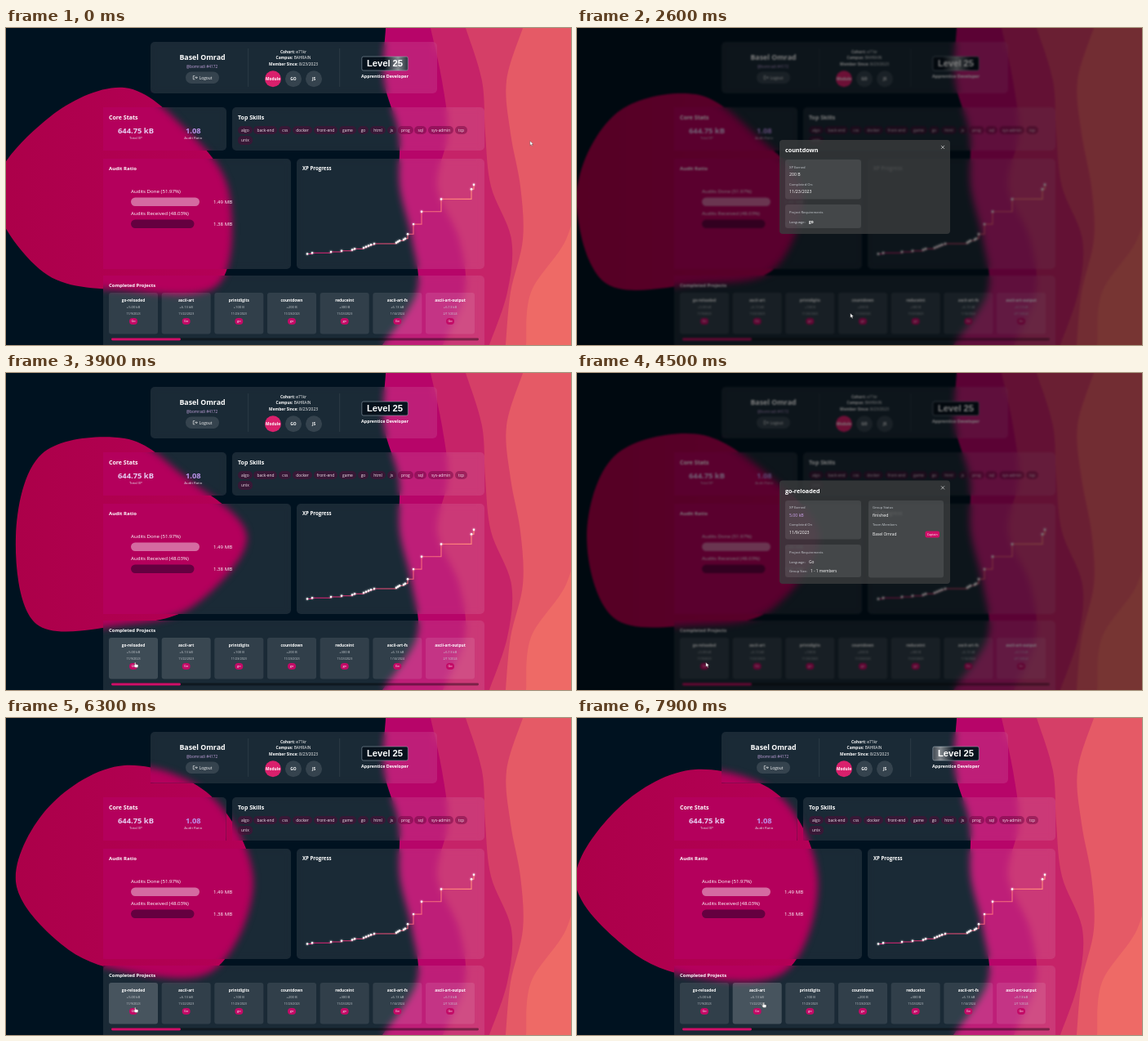
These frames come from a looping animation (692x388 px, 8 s). An HTML page:

```html
<!DOCTYPE html>
<html lang="en">
<head>
<meta charset="utf-8">
<title>Student dashboard</title>
<style>
  html, body { margin: 0; width: 100%; height: 100%; overflow: hidden; background: #001220; }
  #stage { position: relative; width: 692px; height: 388px; overflow: hidden; background: #001220;
    font-family: "Open Sans", "Noto Sans", sans-serif; }
  #stage > * { position: absolute; }
  svg { left: 0; top: 0; width: 692px; height: 388px; overflow: hidden; fill: #fff; }
  text { white-space: pre; }
  .plain { font-family: "Liberation Sans", Arial, sans-serif; }
  .card { border-radius: 5px; background: rgba(255, 255, 255, .1); backdrop-filter: blur(4px); }
  #tags { left: 284px; top: 119.7px; width: 287px; display: flex; flex-wrap: wrap; gap: 2px 1.9px; }
  #tags span { height: 10.5px; padding: 0 4px; border-radius: 5px; background: rgba(95, 0, 55, .42);
    font-size: 4.9px; line-height: 10.2px; color: #f6e3ee; }
  #shade { inset: 0; background: rgba(0, 0, 0, .5); backdrop-filter: blur(1.2px); }
  #dots { filter: drop-shadow(0 0 1px #fff); }
  #soft { filter: blur(4px); }
</style>
</head>
<body>
<div id="stage"></div>
<script>
const LOOP = 8000;
const stage = document.getElementById('stage');
const PERSON = 'Basel Omrad';
const PINK = '#cf0f68', LILAC = '#bd92ea', SOFT = '#c9ced3';

// ---------- helpers ----------
const attrs = o => Object.entries(o).map(([k, v]) => ` ${k}="${v}"`).join('');
const rect = (x, y, w, h, r, fill, o = {}) =>
  `<rect${attrs({ x, y, width: w, height: h, rx: r, fill, ...o })}/>`;
const circle = (cx, cy, r, fill) => `<circle${attrs({ cx, cy, r, fill })}/>`;
const text = (x, y, size, s, o = {}) =>
  `<text${attrs({ x, y, 'font-size': size, ...o })}>${s}</text>`;
const MID = { 'text-anchor': 'middle' };
const BOLD = { 'font-weight': 700 };
const MIDBOLD = { ...MID, ...BOLD };
const add = html => stage.insertAdjacentHTML('beforeend', html);
const layer = (id, body) => add(`<svg id="${id}" viewBox="0 0 692 388">${body}</svg>`);
const clamp = v => Math.max(0, Math.min(1, v));
const smooth = v => (v = clamp(v), v * v * (3 - 2 * v));

// Smooth path through points
function curve(pts, closed) {
  const n = pts.length;
  const at = i => closed ? pts[(i + n) % n] : pts[Math.max(0, Math.min(n - 1, i))];
  let d = 'M' + pts[0];
  for (let i = 0; i < (closed ? n : n - 1); i++) {
    const [a, b, c, e] = [at(i - 1), at(i), at(i + 1), at(i + 2)];
    const c1 = b.map((v, k) => (v + (c[k] - a[k]) / 6).toFixed(2));
    const c2 = c.map((v, k) => (v - (e[k] - b[k]) / 6).toFixed(2));
    d += `C${c1} ${c2} ${c}`;
  }
  return d;
}

// Linear interpolation in rows of [time, ...values]
function track(rows, t) {
  const next = rows.findIndex(r => r[0] >= t);
  if (next === 0) return rows[0].slice(1);
  if (next < 0) return rows[rows.length - 1].slice(1);
  const [a, b] = [rows[next - 1], rows[next]];
  const k = (t - a[0]) / (b[0] - a[0]);
  return a.slice(1).map((v, j) => v + (b[j + 1] - v) * k);
}

// ---------- background and cards ----------
// Left edge of each band at even heights
const WAVES = {
  '#b70569': [465, 463, 481, 482, 497, 503, 461],
  '#c62368': [520, 534, 541, 528, 555, 562, 535],
  '#d53f67': [563, 583, 587, 594, 619, 614, 592],
  '#e55a66': [633, 613, 618, 630, 633, 618, 612],
  '#ee6a66': [700, 700, 700, 700, 686, 643, 637],
};
layer('waves', Object.entries(WAVES).map(([fill, xs]) =>
  `<path fill="${fill}" d="${curve(xs.map((x, i) => [x, i * 388 / 6]))}L700 388V0Z"/>`).join(''));

const CARDS = [[177, 17, 351, 62.5], [119, 97, 150.5, 53], [277, 97, 309, 53],
  [119, 160, 230, 135], [356, 160, 230, 135], [119, 303, 467, 95]];
CARDS.forEach(([x, y, w, h]) =>
  add(`<div class="card" style="left:${x}px;top:${y}px;width:${w}px;height:${h}px"></div>`));

// The blob is sharp between the cards and soft inside them
const inside = CARDS.map(([x, y, w, h]) => `M${x} ${y}h${w}v${h}h${-w}z`).join('');
layer('blob', `<defs>
  <linearGradient id="rose"><stop stop-color="#ac0049"/><stop offset="1" stop-color="#b40057"/></linearGradient>
  <clipPath id="in"><path d="${inside}"/></clipPath>
  <clipPath id="out"><path clip-rule="evenodd" d="M-50-50h800v500h-800z${inside}"/></clipPath></defs>
  <g clip-path="url(#out)"><path class="blob" fill="url(#rose)"/></g>
  <g clip-path="url(#in)"><path class="blob" id="soft" fill="#b4005c"/></g>`);

// ---------- card contents ----------
function header() {
  const line = x => rect(x, 25, .6, 47, 0, 'rgba(255,255,255,.13)');
  const info = (y, k, v) => text(352, y, 4.85, `<tspan font-weight="700">${k}:</tspan> ${v}`, MID);
  const chip = (x, s, fill) => circle(x, 62.3, 10, fill) + text(x, 64.1, 4.8, s, MIDBOLD);
  const grey = 'rgba(255,255,255,.12)';
  return line(296.5) + line(408.5) +
    text(240.5, 39, 8.8, PERSON, MIDBOLD) +
    text(240, 49, 4.8, '@bomradi #4172', { ...MID, fill: '#c3a3dc' }) +
    rect(220, 53.5, 41, 14.5, 7.2, grey) +
    '<path d="M231.3 58.6h-2v4.2h2M231 60.7h3.2m-1.2-1.3 1.3 1.3-1.3 1.3" fill="none" stroke="#fff" stroke-width=".6"/>' +
    text(236.8, 62.6, 4.8, 'Logout') +
    info(31, 'Cohort', 'e71kr') + info(38.3, 'Campus', 'BAHRAIN') +
    info(45.7, 'Member Since', '8/23/2023') +
    chip(327, 'Module', '#d9206c') + chip(352, 'GO', grey) + chip(377, 'JS', grey) +
    `<defs><linearGradient id="shine"><stop stop-color="#fff" stop-opacity="0"/>
      <stop offset=".5" stop-color="#fff" stop-opacity=".5"/>
      <stop offset="1" stop-color="#fff" stop-opacity="0"/></linearGradient>
      <clipPath id="plate">${rect(435.8, 35, 56.5, 17, 2, '#fff')}</clipPath></defs>` +
    rect(435.8, 35, 56.5, 17, 2, '#07121d', { stroke: '#8fa0ae', 'stroke-width': .6 }) +
    `<g clip-path="url(#plate)">${rect(-17, 35, 34, 17, 0, 'url(#shine)', { id: 'sheen' })}</g>` +
    text(464, 47.4, 11.2, 'Level 25', { ...MIDBOLD, class: 'plain' }) +
    text(464, 61, 5.35, 'Apprentice Developer', MIDBOLD);
}

function stats() {
  const stat = (x, v, label, fill) =>
    text(x, 129, 9.4, v, { ...MIDBOLD, fill }) + text(x, 135.6, 4.3, label, { ...MID, fill: '#e3dbe6' });
  return text(126, 112.4, 7, 'Core Stats', BOLD) +
    stat(159, '644.75 kB', 'Total XP', '#e6cdf2') + stat(229.3, '1.08', 'Audit Ratio', LILAC);
}

function audits() {
  const row = (y, label, w, fill, size) => text(153, y, 6.13, label) +
    rect(153, y + 5.2, w, 10.4, 5.2, fill) + text(254, y + 12.9, 6.1, size);
  return text(126, 173.8, 6.05, 'Audit Ratio', BOLD) +
    row(202.4, 'Audits Done (51.97%)', 84, 'rgba(255,255,255,.42)', '1.49 MB') +
    row(229.3, 'Audits Received (48.03%)', 77.5, 'rgba(45,0,45,.58)', '1.38 MB');
}

function chart() {
  const days = [369, 375, 398, 411, 424, 427, 438, 441, 444, 447, 451, 478, 480, 482, 487, 489,
    492, 499, 509, 533, 570, 573];
  // Steady gain per step, with a late surge
  const pts = days.map((x, i) => [x, +(276.5 - 1.25 * i - 58.5 * smooth((i - 15) / 6)).toFixed(1)]);
  const d = pts.map(([x, y], i) => i ? `H${x}V${y}` : `M${x} ${y}`).join('');
  return `<defs><linearGradient id="ink" gradientUnits="userSpaceOnUse" x1="369" x2="573">
    <stop stop-color="#e01a78"/><stop offset="1" stop-color="#ff8b7c"/></linearGradient></defs>` +
    text(363, 173.8, 6.1, 'XP Progress', BOLD) +
    `<path d="${d}" fill="none" stroke="url(#ink)" stroke-width="1.1"/>` +
    `<g id="dots">${pts.map(([x, y]) => circle(x, y, 1.2, '#fff')).join('')}</g>`;
}

const PROJECTS = [
  ['go-reloaded', '+5.00 kB', '11/9/2023', 'Go'], ['ascii-art', '+6.13 kB', '11/22/2023', 'Go'],
  ['printdigits', '+100 B', '11/23/2023', 'go'], ['countdown', '+200 B', '11/23/2023', 'go'],
  ['reduceint', '+300 B', '11/23/2023', 'go'], ['ascii-art-fs', '+6.13 kB', '1/14/2024', 'Go'],
  ['ascii-art-output', '+6.13 kB', '2/11/2024', 'Go'],
];
const TILE = { x: 126, y: 324, w: 60, h: 50.5, step: 64.67 };
const tileX = i => TILE.x + i * TILE.step;

function projects() {
  const list = PROJECTS.map(([name, xp, date, lang], i) => {
    const x = tileX(i), c = x + TILE.w / 2;
    return rect(x, TILE.y, TILE.w, TILE.h, 3, '#fff', { class: 'tile' }) +
      text(c, 334.6, 4.8, name, MIDBOLD) +
      text(c, 343.4, 4.1, xp, { ...MID, fill: SOFT }) +
      text(c, 351.4, 3.6, date, { ...MID, fill: SOFT }) +
      rect(c - 5, 355, 10, 8, 4, '#c30a66') + text(c, 360.4, 3.9, lang, MID);
  }).join('');
  return text(126, 317, 5.9, 'Completed Projects', BOLD) + list +
    rect(129, 379.6, 450, 2.8, 1.4, 'rgba(0,0,0,.4)') + rect(129, 379.6, 85, 2.8, 1.4, PINK);
}

layer('front', header() + stats() + text(284, 112.4, 7, 'Top Skills', BOLD) +
  audits() + chart() + projects());
const SKILLS = 'algo back-end css docker front-end game go html js prog sql sys-admin tcp unix';
add(`<div id="tags">${SKILLS.split(' ').map(s => `<span>${s}</span>`).join('')}</div>`);

// ---------- dialogs ----------
add('<div id="shade"></div>');

const panel = (x, y, w, h) => rect(x, y, w, h, 3, 'rgba(255,255,255,.09)');
const label = (x, y, s) => text(x, y, 4.15, s, { fill: SOFT });
const value = (x, y, s, o) => text(x, y, 5.2, s, o);
const field = (x, y, name, s, o) => label(x, y, name) + value(x, y + 9.3, s, o);

function dialog(top, height, name, body) {
  return rect(248, top, 209, height, 4, 'rgba(58,60,62,.82)') +
    text(255, top + 15.4, 7.2, name, BOLD) +
    `<path d="M446 ${top + 6.9}l4 4m0-4l-4 4" stroke="#ddd" stroke-width=".7"/>` + body;
}
layer('dialogA', dialog(137, 115, 'countdown',
  panel(255, 161, 93, 48.5) + panel(255, 216, 93, 29) +
  field(260, 171.8, 'XP Earned', '200 B') + field(260, 192.8, 'Completed On:', '11/23/2023') +
  label(260, 226.6, 'Project Requirements') +
  label(260, 238.6, 'Language:') + text(284, 238.6, 4.8, 'go', BOLD)));
layer('dialogB', dialog(131.5, 126.5, 'go-reloaded',
  panel(255, 156, 93, 47.5) + panel(255, 210, 93, 40) + panel(357, 156, 92, 94.5) +
  field(260, 166.4, 'XP Earned', '5.00 kB', { fill: '#cfa6f0' }) +
  field(260, 187.2, 'Completed On', '11/9/2023') +
  label(260, 221, 'Project Requirements') +
  label(260, 233, 'Language:') + text(284, 233, 4.8, 'Go') +
  label(260, 244, 'Group Size:') + text(286, 244, 4.8, '1 - 1 members') +
  field(362, 166.4, 'Group Status', 'finished') +
  label(362, 187.2, 'Team Members') + text(362, 199.4, 4.9, PERSON) +
  rect(426.5, 193.5, 17.5, 8, 2, PINK) + text(435.2, 198.8, 3.6, 'Captain', MID)));

// ---------- pointer ----------
layer('pointer', `<g id="cursor" stroke="#222" stroke-width=".3">
  <path id="arrow" d="M-1.2-2.7V2.6L.1 1.5 1 3.4 1.9 3 1.1 1.1H2.7Z"/>
  <path id="hand" d="M-1.4-2.6q.7-.7 1.2 0V-.6L2.2 0q.9.3.8 1.2L2.4 3.4H-1L-2.8.8q.3-.9 1.4 0Z"/></g>`);

// ---------- motion ----------
// time, then blob radii clockwise every 45 degrees from the right
const BLOB = [
  [0, 128, 162, 121, 140, 160, 129, 127, 107],
  [1500, 115, 148, 118, 162, 155, 130, 118, 98],
  [3900, 150, 120, 108, 152, 133, 143, 120, 104],
  [6300, 158, 154, 110, 109, 133, 130, 142, 149],
  [7900, 150, 156, 117, 117, 147, 130, 137, 147],
];
const PATH = [[300, 643, 141], [900, 557, 318], [1350, 336, 352], [3300, 336, 352],
  [3880, 159, 357], [6700, 159, 357], [7100, 229, 351]];
const FADE = 200;
const OPEN_A = [2050, 3100], OPEN_B = [4200, 5800];
const SHEEN = { period: 2750, x: 480, speed: .1, lead: 800 };

const $ = id => document.getElementById(id);
const tiles = [...document.querySelectorAll('.tile')];
const blobs = document.querySelectorAll('.blob');
const shown = (t, [from, to]) => Math.min(clamp((t - from) / FADE), clamp((to + FADE - t) / FADE));
const isOpen = t => [OPEN_A, OPEN_B].some(([a, b]) => t >= a && t < b);

function hovered(t) {
  if (isOpen(t)) return -1;
  const [x, y] = track(PATH, t);
  if (y < TILE.y || y > TILE.y + TILE.h) return -1;
  return PROJECTS.findIndex((_, i) => x >= tileX(i) && x <= tileX(i) + TILE.w);
}

function draw(t) {
  const pts = track(BLOB, t).map((r, i) => {
    const a = i * Math.PI / 4;
    return [145 + r * Math.cos(a), 200 + r * Math.sin(a)].map(v => +v.toFixed(2));
  });
  const shape = curve(pts, true);
  blobs.forEach(b => b.setAttribute('d', shape));

  // Highlight follows the share of recent time spent over a tile
  const recent = Array.from({ length: 8 }, (_, i) => hovered(t - i * FADE / 8));
  tiles.forEach((tile, i) => {
    const share = recent.filter(h => h === i).length / 8;
    tile.setAttribute('fill-opacity', .1 + .1 * share);
  });

  const a = shown(t, OPEN_A), b = shown(t, OPEN_B);
  $('dialogA').style.opacity = a;
  $('dialogB').style.opacity = b;
  $('shade').style.opacity = Math.max(a, b);
  $('shade').style.display = a || b ? 'block' : 'none';

  const sweep = (t + SHEEN.lead) % SHEEN.period - SHEEN.lead;
  $('sheen').setAttribute('transform', `translate(${(SHEEN.x + SHEEN.speed * sweep).toFixed(2)} 0)`);

  const [x, y] = track(PATH, t), over = hovered(t) >= 0;
  $('cursor').setAttribute('transform', `translate(${x.toFixed(2)} ${y.toFixed(2)})`);
  $('arrow').style.display = over ? 'none' : 'inline';
  $('hand').style.display = over ? 'inline' : 'none';
}

const start = performance.now();
function tick() {
  draw((performance.now() - start) % LOOP);
  requestAnimationFrame(tick);
}
tick();
</script>
</body>
</html>
```
